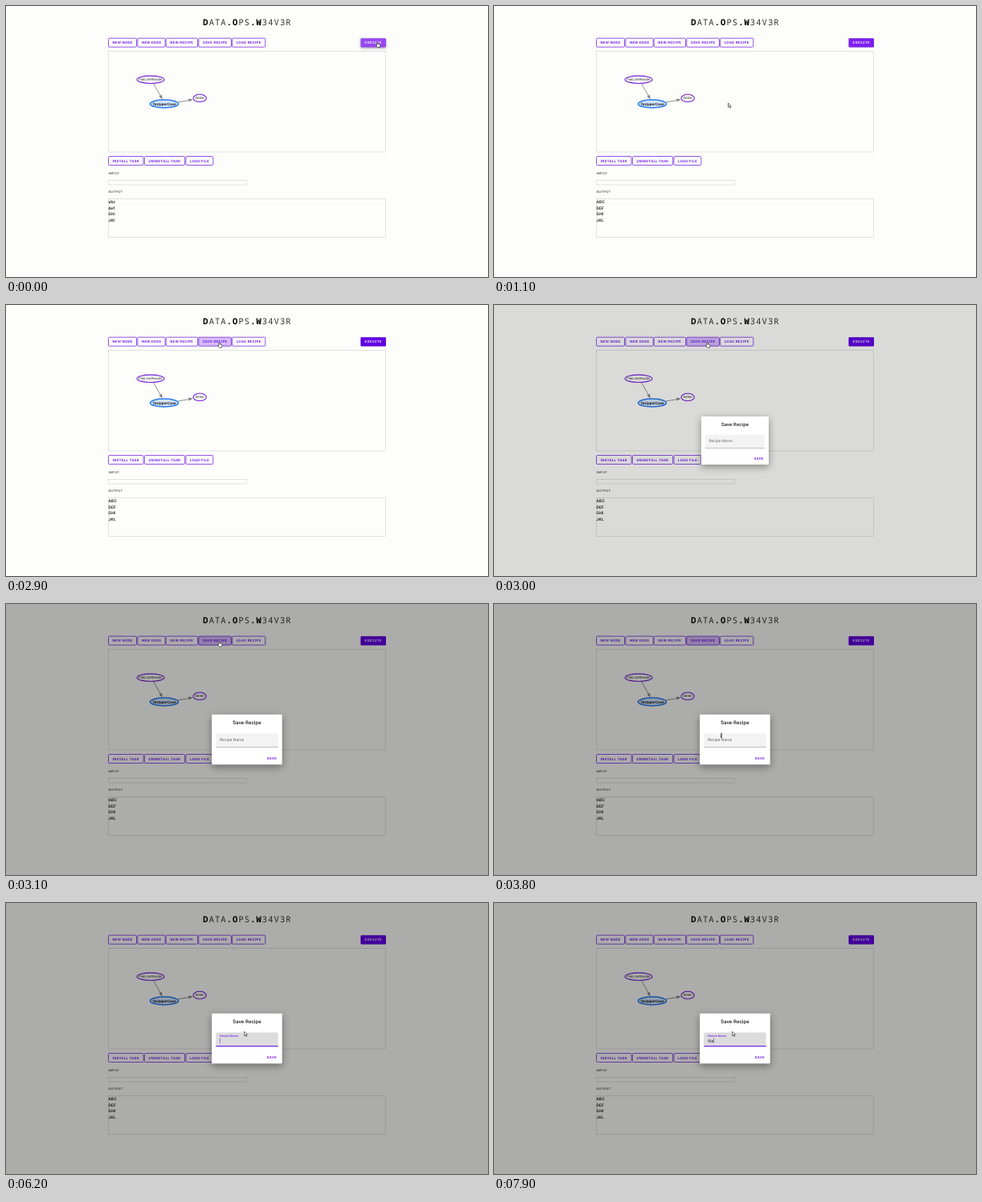
Animation of 600x338 px, one loop 8 s. Source, as an HTML page:

```html
<!DOCTYPE html>
<html lang="en">
<head>
<meta charset="utf-8">
<title>Recipe editor</title>
<style>
  html, body { margin: 0; width: 100%; height: 100%; overflow: hidden; background: #fdfdfb; }
  svg { display: block; width: 600px; height: 338px; }
  text { font-family: Roboto, sans-serif; text-rendering: geometricPrecision; white-space: pre; }
  .title { font: 300 10.5px "Noto Sans Mono", monospace; letter-spacing: 1.05px; fill: #333; }
  .title .b { font-weight: 800; fill: #000; }
  .btn { font-size: 4.375px; font-weight: 500; letter-spacing: .39px; fill: #6200ee; }
  .cap { font-size: 3.75px; font-weight: 500; letter-spacing: .625px; fill: #333; }
  .out { font-size: 5px; font-weight: 500; letter-spacing: .2px; fill: #111; }
  .node { font: 4.375px "Liberation Sans", Arial, sans-serif; fill: #343434; text-anchor: middle; }
  .picked { font-weight: 700; font-size: 4.55px; fill: #111; }
  .head { font-size: 6.25px; font-weight: 500; letter-spacing: .12px; fill: #222; text-anchor: middle; }
  .entry { font-size: 5px; letter-spacing: .05px; fill: #222; }
  .box { fill: none; stroke: #d6d6d6; stroke-width: .7; }
</style>
</head>
<body>
<svg id="stage" viewBox="0 0 600 338" xmlns="http://www.w3.org/2000/svg">
  <rect width="600" height="338" fill="#fdfdfb"/>
  <text class="title" x="245.3" y="24.2"><tspan class="b">D</tspan>ATA<tspan class="b">.O</tspan>PS<tspan class="b">.W</tspan>34V3R</text>
  <g id="buttons"></g>
  <g id="execute">
    <rect id="execBox" x="441.5" y="40.2" width="31.5" height="11.2" rx="1.2"/>
    <text class="btn" x="446.6" y="47.4" style="fill:#fff">EXECUTE</text>
  </g>

  <rect class="box" x="127.5" y="56.5" width="345" height="125.5"/>
  <g stroke="#777" stroke-width=".8" fill="#777">
    <path d="M183.3 96.4L192.4 112.2M214.3 119.8L228 117.6"/>
    <path stroke="none" d="M194.7 116.4L190.2 112.4L192.4 112.3L193.8 110.4Z"/>
    <path stroke="none" d="M232.8 116.7L227.2 119.6L228 117.6L226.7 115.6Z"/>
  </g>
  <g fill="#fdfdfb" stroke="#7420d6" stroke-width="1.1">
    <ellipse cx="180" cy="91.8" rx="17" ry="4.7"/>
    <ellipse cx="241.2" cy="114.9" rx="8.2" ry="4.6"/>
    <ellipse cx="197" cy="122" rx="17.5" ry="5" fill="#d2e5ff" stroke="#2b7ce9" stroke-width="1.6"/>
  </g>
  <text class="node" x="180" y="93.3">FileLineReader</text>
  <text class="node" x="241.2" y="116.4">Writer</text>
  <text class="node picked" x="197" y="123.5">ToUpperCase</text>

  <text class="cap" x="127.4" y="209.7">INPUT</text>
  <rect class="box" x="127.5" y="217.5" width="172" height="5.5"/>
  <text class="cap" x="127.4" y="233.1">OUTPUT</text>
  <rect class="box" x="127.5" y="240.5" width="345" height="48"/>
  <g id="output"></g>

  <rect id="scrim" width="600" height="338"/>
  <g id="dialog">
    <rect x="256.2" y="137.8" width="87.5" height="62.5" rx="1.2" fill="#fff" style="filter:drop-shadow(0 3px 5px rgba(0,0,0,.38))"/>
    <text class="head" x="300" y="150.3">Save Recipe</text>
    <path id="field" d="M261.3 178.9V162.6Q261.3 161.4 262.5 161.4H337.5Q338.7 161.4 338.7 162.6V178.9Z"/>
    <rect id="line" x="261.3" width="77.4"/>
    <text id="label" class="entry" x="266.2">Recipe Name</text>
    <text id="typed" class="entry" x="266.3" y="173.8"></text>
    <rect id="caret" y="169" width=".55" height="5.7" fill="#6200ee"/>
    <text class="btn" x="324.8" y="193.7">SAVE</text>
  </g>
  <g id="cursor" stroke="#222" stroke-width=".65" stroke-linejoin="round" fill="#fff">
    <path id="arrow" d="M0 0V5.2L1.2 4.2L2.1 6.2L3 5.8L2.1 3.8H3.7Z"/>
    <path id="hand" d="M-.6 .6Q0 -.3 .6 .6V2.7L2.9 3.2Q3.6 3.4 3.4 4.2L2.8 7H-.1L-2 4.6Q-1.8 3.7 -.6 4.4Z"/>
    <path id="beam" fill="none" d="M-1.1 -2.8Q0 -2.8 0 -2V2Q0 2.8 -1.1 2.8M1.1 -2.8Q0 -2.8 0 -2V2Q0 2.8 1.1 2.8M-.7 1H.7"/>
  </g>
</svg>
<script>
const LOOP = 8000, TICK = 100;
const SAVE_DOWN = 2800, OPEN = 3000, FOCUS = 4200, RESULT = 300;
const $ = id => document.getElementById(id);
const set = (el, attrs) => { for (const k in attrs) el.setAttribute(k, attrs[k]); };
const show = (el, on) => el.setAttribute("visibility", on ? "visible" : "hidden");

// label, left, top, width
const buttons = [
  ["NEW NODE", 127.5, 40.2, 35], ["NEW EDGE", 163.9, 40.2, 34.2],
  ["NEW RECIPE", 199.2, 40.2, 39.4], ["SAVE RECIPE", 239.8, 40.2, 40.6],
  ["LOAD RECIPE", 281.6, 40.2, 41.2], ["INSTALL TASK", 127.5, 187.5, 43.5],
  ["UNINSTALL TASK", 172.4, 187.5, 50.2], ["LOAD FILE", 224, 187.5, 33.8]
];
$("buttons").innerHTML = buttons.map(([label, x, y, w]) =>
  `<rect x="${x}" y="${y}" width="${w}" height="11" rx="1.2" fill="#6200ee" fill-opacity="0" stroke="#7a2be8" stroke-width=".8"/>
   <text class="btn" x="${x + 5.1}" y="${y + 7.2}">${label}</text>`).join("");
const saveBox = $("buttons").querySelectorAll("rect")[3];

const before = ["abc", "def", "GhI", "JKl"];
$("output").innerHTML = before.map((s, i) =>
  `<text class="out" x="127.6" y="${246.4 + i * 7.5}"></text>`).join("");
const rows = [...$("output").children];

// time, x, y
const path = [
  [0, 462.5, 44.6], [300, 462.5, 44.6], [1000, 291.5, 121], [1600, 291.5, 121],
  [2500, 265.6, 46.2], [3200, 265.6, 46.2], [3900, 284, 171], [4200, 284, 171],
  [4500, 288, 151], [4900, 288, 151], [5500, 296.7, 160.3], [LOOP, 296.7, 160.3]
];
const keys = [[7100, "f"], [7300, "i"], [7500, "l"], [7800, "e"]];

function pointer(t) {
  const i = path.findIndex(p => p[0] > t);
  const [t0, x0, y0] = path[i - 1], [t1, x1, y1] = path[i];
  const u = (t - t0) / (t1 - t0), e = u * u * (3 - 2 * u);
  return [x0 + (x1 - x0) * e, y0 + (y1 - y0) * e];
}

function pointerKind(x, y, open) {
  const inside = (l, t, r, b) => x >= l && x <= r && y >= t && y <= b;
  if (open) return inside(282, 144, 318, 152) || inside(261, 161.4, 339, 179) ? "beam" : y < 60 ? "hand" : "arrow";
  const onButton = inside(441, 40, 473, 52) || buttons.some(([, l, t, w]) => inside(l, t, l + w, t + 11));
  return onButton ? "hand" : "arrow";
}

function draw(t) {
  const open = t >= OPEN, focused = t >= FOCUS;
  const [x, y] = pointer(t);
  const kind = pointerKind(x, y, open);
  set($("cursor"), { transform: `translate(${x} ${y})` });
  for (const k of ["arrow", "hand", "beam"]) show($(k), k === kind);

  const hot = x > 441;
  set($("execBox"), { fill: hot ? "#9648f2" : t < SAVE_DOWN ? "#7d20ee" : "#6200e4" });
  $("execBox").style.filter = hot ? "drop-shadow(0 1.2px 1.4px rgba(0,0,0,.4))" : "drop-shadow(0 .5px .5px rgba(0,0,0,.25))";

  const overSave = !open && kind === "hand" && !hot && x > 239 && x < 281;
  set(saveBox, { "fill-opacity": t >= SAVE_DOWN && !focused ? .26 : overSave ? .06 : 0 });
  rows.forEach((row, i) => row.textContent = t < RESULT ? before[i] : before[i].toUpperCase());

  const fade = Math.min(1, Math.max(0, (t - OPEN + 65) / 150));
  set($("scrim"), { "fill-opacity": open ? .32 * fade : 0 });
  const s = t < OPEN + TICK ? .96 : 1;
  set($("dialog"), { transform: `translate(300 169) scale(${s}) translate(-300 -169)` });
  show($("dialog"), open);
  set($("field"), { fill: focused ? "#dcdcdc" : "#f4f3f4" });
  set($("line"), focused ? { y: 178.1, height: 1, fill: "#6200ee" } : { y: 178.5, height: .5, fill: "#888" });
  set($("label"), { y: focused ? 167.3 : 171.3 });
  $("label").style.cssText = focused ? "font-size:3.75px;fill:#6200ee" : "fill:#666";

  const hit = keys.filter(k => k[0] <= t);
  const last = hit.length ? hit[hit.length - 1][0] : FOCUS;
  $("typed").textContent = hit.map(k => k[1]).join("");
  set($("caret"), { x: 266.4 + (hit.length ? $("typed").getComputedTextLength() : 0) });
  show($("caret"), focused && (t - last) % 1000 < 500);
}

const start = performance.now();
function loop() {
  const t = (performance.now() - start) % LOOP;
  draw(Math.floor(t / TICK) * TICK);
  requestAnimationFrame(loop);
}
draw(0);
requestAnimationFrame(loop);
</script>
</body>
</html>
```
